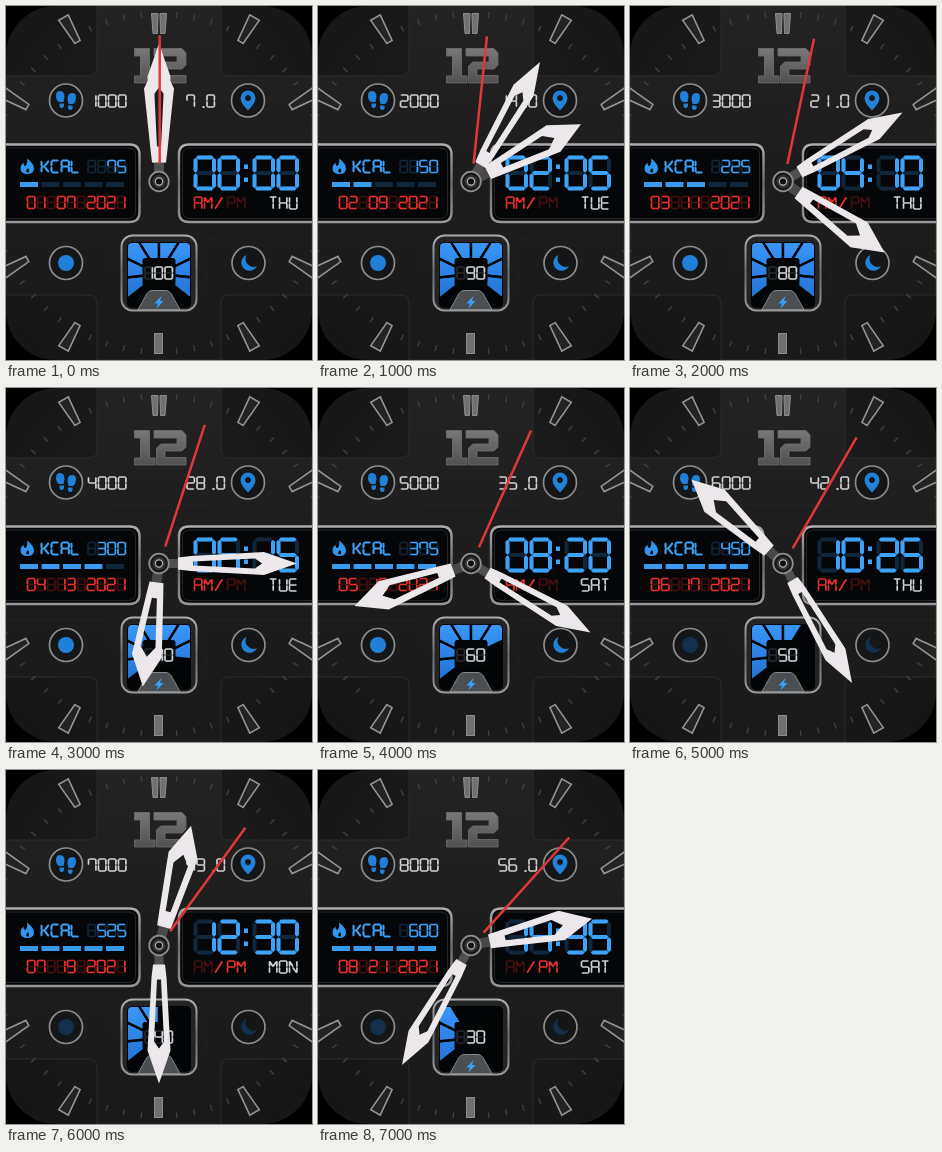
Recreate the animation shown at these times as an HTML page. Size 306x354 px, loop 8 s.

```html
<!DOCTYPE html>
<html lang="en">
<head>
<meta charset="utf-8">
<title>Watch face</title>
<style>
html, body { margin: 0; width: 100%; height: 100%; overflow: hidden; background: #000; }
svg { display: block; width: 306px; height: 354px; }
</style>
</head>
<body>
<svg viewBox="0 0 306 354" role="img" aria-label="Watch face">
  <defs>
    <radialGradient id="face" cx=".5" cy=".45" r=".65">
      <stop offset="0" stop-color="#202120"/><stop offset="1" stop-color="#151615"/>
    </radialGradient>
    <linearGradient id="band" x2="0" y2="1">
      <stop offset="0" stop-color="#232323"/><stop offset=".45" stop-color="#1d1d1d"/><stop offset="1" stop-color="#191a19"/>
    </linearGradient>
    <linearGradient id="rim" x2="0" y2="1">
      <stop offset="0" stop-color="#acacac"/><stop offset=".5" stop-color="#6c6c6c"/><stop offset="1" stop-color="#989898"/>
    </linearGradient>
    <linearGradient id="steel" x2="0" y2="1">
      <stop offset="0" stop-color="#787878"/><stop offset="1" stop-color="#505050"/>
    </linearGradient>
    <linearGradient id="blue" gradientUnits="userSpaceOnUse" x1="0" y1="236" x2="0" y2="297">
      <stop offset="0" stop-color="#3a97fa"/><stop offset="1" stop-color="#1f6fd0"/>
    </linearGradient>
    <clipPath id="shape"><rect width="306" height="354" rx="50"/></clipPath>
    <clipPath id="window"><rect x="122" y="237" width="62" height="60" rx="4"/></clipPath>
  </defs>
  <g clip-path="url(#shape)">
    <rect width="306" height="354" fill="url(#face)"/>
    <path d="M91 0V62Q91 70 83 70H0V289H83Q91 289 91 297V354H215V297Q215 289 223 289H306V70H223Q215 70 215 62V0Z" fill="url(#band)" stroke="#2c2d2c"/>
    <path d="M0 124H92Q100 124 104 117H202Q206 124 214 124H306M0 232H98Q106 232 106 240V300M306 232H208Q200 232 200 240V300" fill="none" stroke="#272827" stroke-dasharray="2 2"/>
    <g id="ticks"></g>
    <g stroke="#8d8d8d" fill="#707070">
      <path d="M145.500 7.500h6.500l-.5 20h-4.500zM154 7.500h6.500l-1.500 20h-4.500z"/>
      <rect x="148.500" y="327.500" width="8" height="20"/>
    </g>
    <g fill="url(#steel)" stroke="#707070" stroke-width=".8">
      <path d="M128.500 42.500H143.500V70H149V77H128.500V70H134.500V50H128.500Z"/>
      <path d="M148 42.500H176L180 47V59L176 63H159V69.500H180V77H150.500V60L155 56H171V50H148Z"/>
    </g>

    <g fill="#151617" stroke="#8c8c8c" stroke-width="1.700">
      <circle cx="60" cy="94.500" r="16.500"/><circle cx="242" cy="94.500" r="16.500"/>
      <circle cx="60" cy="257" r="16.500"/><circle cx="242.500" cy="257" r="16.500"/>
    </g>
    <g fill="#2180d8">
      <path d="M50 90Q50 85 54 85Q58.500 85 58.500 91L57.500 96H53Q50 94 50 90ZM53.500 97.500H58Q58.500 102 55.500 102Q53 102 53.500 97.500Z"/>
      <path d="M70 91Q70 87 66 87Q61.500 87 61.500 93L62.500 98H67Q70 96 70 91ZM62 99.500H66.500Q67 104 64.500 104Q61.500 104 62 99.500Z"/>
      <path fill-rule="evenodd" d="M242 104.500Q234.500 97 234.500 92A7.500 7.500 0 0 1 249.500 92Q249.500 97 242 104.500ZM242 89a3 3 0 1 0 .01 0Z"/>
    </g>
    <g id="status">
      <circle cx="60" cy="257" r="8"/>
      <path d="M240.500 249A8.200 8.200 0 1 0 251 260A8 8 0 0 1 240.500 249Z"/>
    </g>

    <g fill="#050607" stroke="url(#rim)" stroke-width="2.400">
      <path d="M-4 138.500H123.500Q133.500 138.500 133.500 148.500V206Q133.500 216 123.500 216H-4Z"/>
      <path d="M310 138.500H183Q173 138.500 173 148.500V206Q173 216 183 216H310Z"/>
    </g>
    <path d="M0 142H122Q129.500 142 129.500 149V205Q129.500 212.500 122 212.500H0M306 142H184Q176.500 142 176.500 149V205Q176.500 212.500 184 212.500H306" fill="none" stroke="#24282c"/>
    <path d="M21 152.500Q28.500 158 28 163Q27.500 168 21.500 168Q14.500 168 14.500 162Q14.500 159 17.500 156.500Q17.500 160 19.500 160Q22 158 21 152.500ZM22 162Q19.500 164.500 20.500 166Q21.500 167 23 166Q24 164.500 22 162Z" fill="#3197ee" fill-rule="evenodd"/>
    <g id="bars"></g>

    <rect x="115.500" y="229.500" width="75" height="75" rx="11" fill="#222425" stroke="url(#rim)" stroke-width="2"/>
    <rect x="121" y="236" width="64" height="66" rx="5" fill="#030405"/>
    <g id="fan" clip-path="url(#window)" fill="url(#blue)" stroke="#030405" stroke-width="2.400"></g>
    <rect x="136.500" y="252" width="33" height="28" rx="3" fill="#050607"/>
    <path d="M132 303.500L141 287.500Q143 284.500 146 284.500H160Q163 284.500 165 287.500L174 303.500Z" fill="#4c4f51" stroke="#85888a"/>
    <path d="M155.500 290L148.500 297.500H152L150.500 302.500L157.500 295H154Z" fill="#3ba0fa"/>

    <g id="digits"></g>

    <g transform="translate(153 175.500)">
      <g id="hour">
        <path d="M-5 -8H5V-21H-5Z" fill="#484848"/>
        <path fill="#ebe7ea" fill-rule="evenodd" d="M-7 -19H7L8.500 -32L15 -93L0 -124L-15 -93L-8.500 -32ZM-2.500 -35L-7.500 -84L0 -94L7.500 -84L2.500 -35Z"/>
      </g>
      <g id="minute">
        <path d="M-4.500 -8H4.500V-21H-4.500Z" fill="#505050"/>
        <path fill="#ebe7ea" fill-rule="evenodd" d="M-6 -19H6L7.500 -32L11.500 -105L0 -138L-11.500 -105L-7.500 -32ZM-2 -34L-5 -96L0 -103L5 -96L2 -34Z"/>
      </g>
      <circle r="9.800" fill="#191919" stroke="#8d8d8d" stroke-width="1.800"/>
      <circle r="6.500" fill="#363636"/>
      <circle r="3.600" fill="#0d0d0d" stroke="#b5b5b5" stroke-width="1.200"/>
      <path id="second" d="M.7 -18V-146" stroke="#e0383a" stroke-width="2.500"/>
    </g>
  </g>
</svg>
<script>
const $ = id => document.getElementById(id);
const STEP = 1000, COUNT = 8;
const BLUE = '#3da3fa', RED = '#e8302e', PALE = '#cfd2d4';
const DIM_BLUE = '#10263b', DIM_RED = '#43100f', DIM_PALE = '#282a2c';

// Segment ends on a unit cell
const SEG = {
  a: [0, 0, 1, 0], b: [1, 0, 1, .5], c: [1, .5, 1, 1], d: [0, 1, 1, 1],
  e: [0, .5, 0, 1], f: [0, 0, 0, .5], g: [0, .5, 1, .5], k: [0, .5, .5, .5],
  h: [0, 0, .5, .5], i: [.5, 0, .5, .5], j: [1, 0, .4, .5],
  l: [.5, .5, .5, 1], m: [.4, .5, 1, 1], s: [1, 0, 0, 1]
};
const GLYPH = {
  0: 'abcdef', 1: 'bc', 2: 'abged', 3: 'abgcd', 4: 'fgbc', 5: 'afgcd',
  6: 'afgedc', 7: 'abcf', 8: 'abcdefg', 9: 'abcdfg',
  K: 'efkjm', C: 'adef', A: 'abcefg', L: 'def', M: 'bcefhj', P: 'abefg',
  T: 'ail', H: 'bcefg', U: 'bcdef', S: 'afgcd', E: 'adefg', O: 'abcdef',
  N: 'bcefhm', '/': 's', ' ': ''
};
const SMALL = { w: 7.4, h: 12, t: 1.7, pitch: 10, gap: 0 };
const BIG = { w: 18.5, h: 31, t: 4, pitch: 24, gap: .3 };

const pad = n => String(n).padStart(2, '0');

function bar(x1, y1, x2, y2, t, gap) {
  const len = Math.hypot(x2 - x1, y2 - y1), r = t / 2;
  const ux = (x2 - x1) / len, uy = (y2 - y1) / len;
  const at = (along, side) =>
    (x1 + ux * along - uy * side).toFixed(2) + ' ' + (y1 + uy * along + ux * side).toFixed(2);
  const a = gap, b = len - gap;
  return 'M' + [at(a, 0), at(a + r, r), at(b - r, r), at(b, 0), at(b - r, -r), at(a + r, -r)].join('L') + 'Z';
}

function write(text, x, y, color, font = SMALL) {
  let d = '';
  [...text].forEach((ch, n) => {
    const left = x + n * font.pitch;
    for (const key of GLYPH[ch]) {
      const [x1, y1, x2, y2] = SEG[key];
      d += bar(left + x1 * font.w, y + y1 * font.h, left + x2 * font.w, y + y2 * font.h, font.t, font.gap);
    }
  });
  return `<path d="${d}" fill="${color}"/>`;
}

const ghosted = (text, x, y, color, dim, font) =>
  write('8'.repeat(text.length), x, y, dim, font) + write(text, x, y, color, font);

function drawTicks() {
  let out = '';
  for (let n = 0; n < 60; n++) {
    const turn = `transform="translate(153 177) rotate(${n * 6})"`;
    if (n % 5) {
      out += `<path ${turn} d="M0 -166V-172" stroke="#3e3f3f" stroke-width="1.5"/>`;
    } else if (n % 15) {
      const r = [10, 20, 40, 50].includes(n) ? 152 : 163;
      out += `<path ${turn} d="M-3 ${-r}H3L5.500 ${-r - 28}H-5.500Z" fill="#222323" stroke="#949494" stroke-width="1.6"/>`;
    }
  }
  $('ticks').innerHTML = out;
}

function wedge(n) {
  const point = k => {
    const a = (k - 4) * 32 * Math.PI / 180;
    return (153 + 65 * Math.sin(a)).toFixed(1) + ' ' + (268 - 65 * Math.cos(a)).toFixed(1);
  };
  return `<path d="M153 268L${point(n)}L${point(n + 1)}Z"/>`;
}

function show(i) {
  const k = i + 1, power = 100 - i * 10, pm = i >= 6;
  const hours = pad(2 * i), mins = pad(5 * i);
  const km = String(7 * k);
  const day = ['THU', 'TUE', 'THU', 'TUE', 'SAT', 'THU', 'MON', 'SAT'][i];

  let out = write(String(k * 1000), 82.5, 89, PALE);
  out += write(km + ' 0', 181, 89, PALE);
  out += `<rect x="${186.5 + km.length * 10}" y="100" width="2" height="2" fill="${PALE}"/>`;

  out += write('KCAL', 35.5, 154.5, BLUE, { ...SMALL, t: 2.1 });
  out += ghosted(String(75 * k).padStart(4), 82, 154.5, BLUE, DIM_BLUE);
  out += ghosted(`${pad(k)} ${pad(5 + 2 * k)} 2021`, 21.5, 190.5, RED, DIM_RED);

  out += ghosted(hours, 189.5, 151.5, BLUE, DIM_BLUE, BIG);
  out += ghosted(mins, 248.5, 151.5, BLUE, DIM_BLUE, BIG);
  out += `<path d="M238 158.5h4v4.5h-4zM238 171.5h4v4.5h-4z" fill="${BLUE}"/>`;
  out += write('AM', 188.5, 191, pm ? DIM_RED : RED);
  out += write('/', 209, 191, RED);
  out += write('PM', 221.5, 191, pm ? RED : DIM_RED);
  out += write(day, 263.5, 191, PALE);
  out += ghosted(String(power).padStart(3), 139, 261, PALE, DIM_PALE);
  $('digits').innerHTML = out;

  let bars = '', fan = '';
  for (let n = 0; n < 5; n++)
    bars += `<rect x="${14 + n * 21.5}" y="176" width="18" height="5" fill="${n < k ? '#389bf0' : DIM_BLUE}"/>`;
  for (let n = 0; n < Math.min(8, power / 10); n++) fan += wedge(n);
  $('bars').innerHTML = bars;
  $('fan').innerHTML = fan;

  $('status').setAttribute('fill', i < 5 ? '#2180d8' : '#14304d');
  const turn = (id, deg) => $(id).setAttribute('transform', `rotate(${deg})`);
  turn('hour', 62.5 * i);
  turn('minute', 30 * i);
  turn('second', 6 * i);
}

drawTicks();
let shown = 0;
show(0);
const start = performance.now();
function tick() {
  const i = Math.floor((performance.now() - start) / STEP) % COUNT;
  if (i !== shown) show(shown = i);
  requestAnimationFrame(tick);
}
requestAnimationFrame(tick);
</script>
</body>
</html>
```
